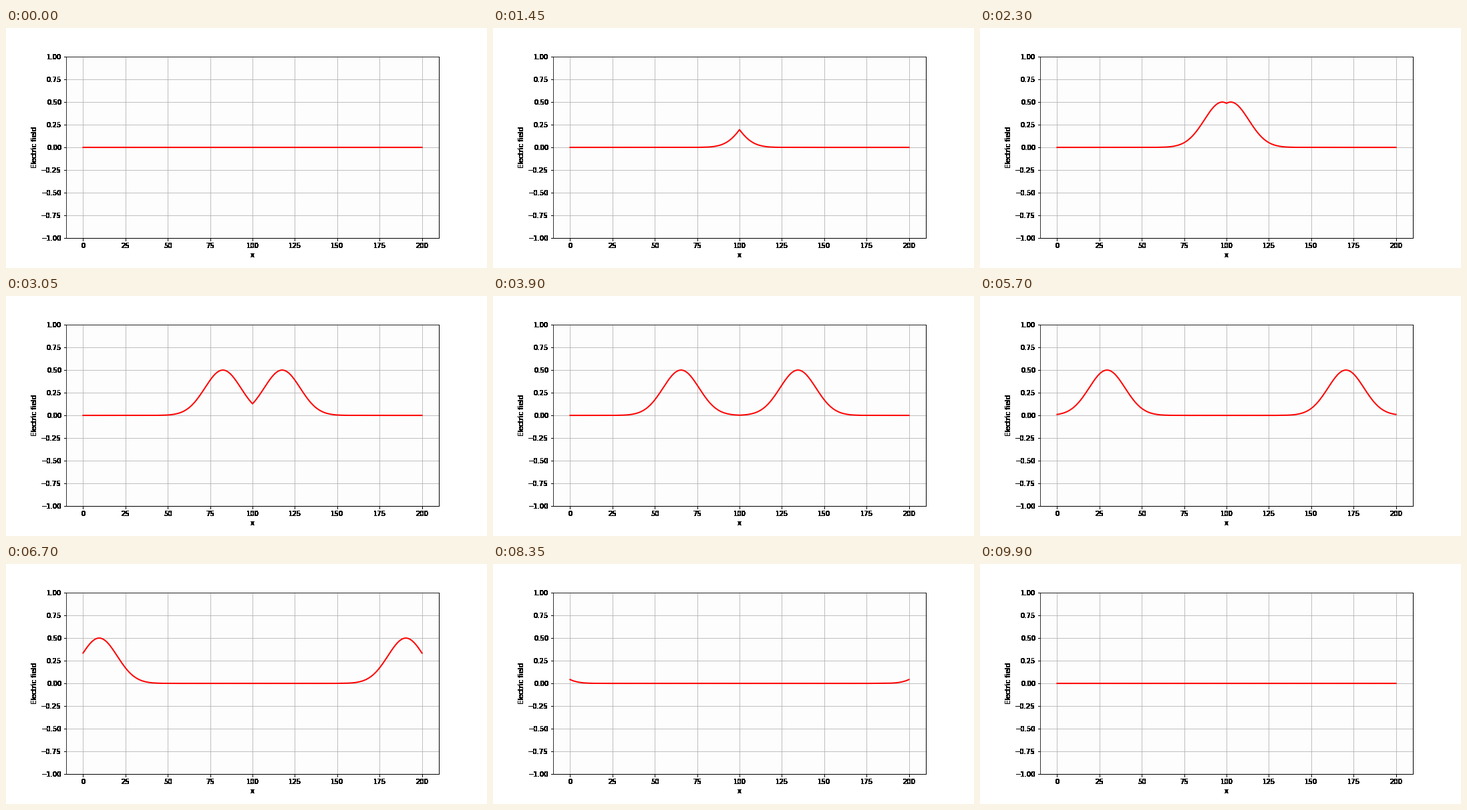
Animation, 720 px wide and 360 px high, one loop 9.95 s. Source, as a matplotlib script:

```python
import matplotlib.pyplot as plt
import numpy as np
from matplotlib.animation import FuncAnimation

WIDTH, HEIGHT, DPI = 720, 360, 72
FRAMES, INTERVAL = 199, 50
CELLS, SOURCE = 201, 100
DELAY, SPREAD = 45, 15


def simulate():
    """Return E for every step of a 1-D FDTD run with open ends."""
    e = np.zeros(CELLS)
    h = np.zeros(CELLS - 1)
    history = []
    for step in range(1, FRAMES + 1):
        left, right = e[1], e[-2]
        e[1:-1] += h[:-1] - h[1:]
        e[0], e[-1] = left, right
        e[SOURCE] += np.exp(-((step - DELAY) / SPREAD) ** 2)
        h += e[:-1] - e[1:]
        history.append(e.copy())
    return history


def render_backdrop(fig):
    """Flatten the static plot, with hard-edged labels outside the axes."""
    fig.canvas.draw()
    rgba = np.asarray(fig.canvas.buffer_rgba()).copy()
    rgb = rgba[..., :3]
    rgb[rgba[..., 3] == 0] = 255
    return rgb


plt.rcParams["font.family"] = "DejaVu Sans"
plt.rcParams["font.size"] = 10

fig = plt.figure(figsize=(WIDTH / DPI, HEIGHT / DPI), dpi=DPI, facecolor="none")
ax = fig.add_axes([0.125, 0.125, 0.775, 0.755], facecolor="#fdfdfd")
ax.set_xlim(-10, 210)
ax.set_ylim(-1, 1)
ax.set_xlabel("x")
ax.set_ylabel("Electric field")
ax.grid(True)

# The plot never changes, so it is drawn once and reused under the curve.
backdrop = render_backdrop(fig)
ax.set_axis_off()
fig.set_facecolor("white")
fig.figimage(backdrop, zorder=-1, origin="upper")

fields = simulate()
x = np.arange(CELLS)
curve, = ax.plot(x, fields[0], color="red", lw=2)


def update(frame):
    curve.set_ydata(fields[frame])
    return curve,


anim = FuncAnimation(fig, update, frames=FRAMES, interval=INTERVAL,
                     repeat=True, repeat_delay=0)
plt.show()
```
